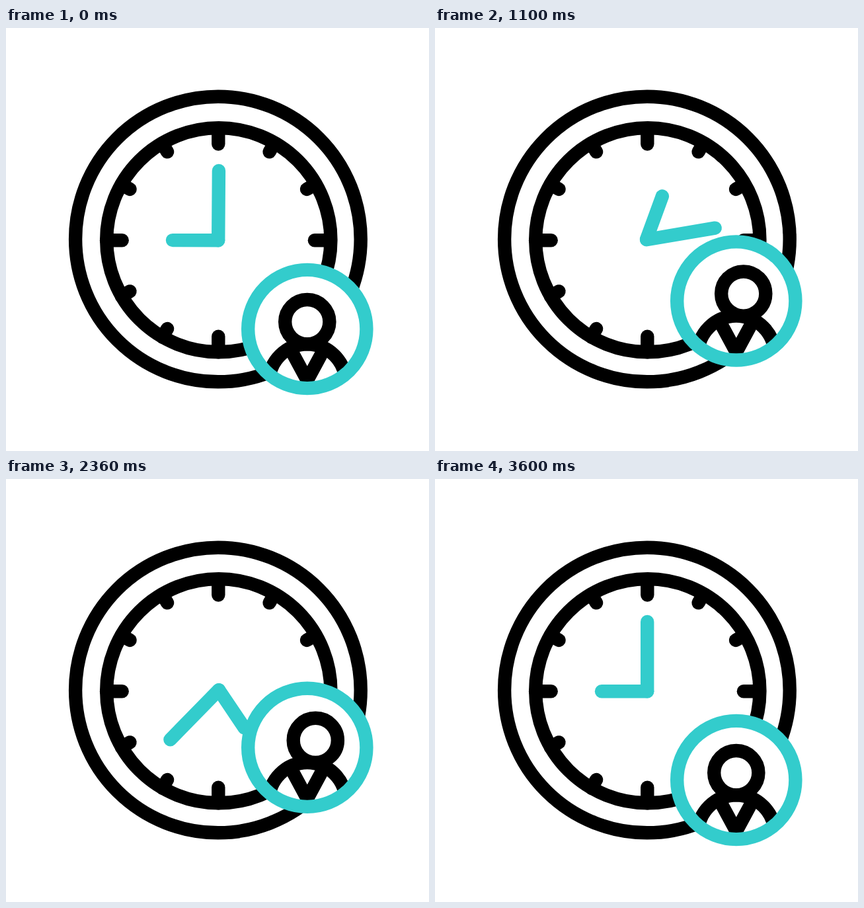
An HTML page for the animation above (3.62 s loop, 640 by 640 pixels).

```html
<!DOCTYPE html>
<html lang="en">
<head>
<meta charset="utf-8">
<title>Clock with person badge</title>
<style>
  html, body { margin: 0; height: 100%; overflow: hidden; background: #fff; }
  svg { display: block; width: 100vw; height: 100vh; }
  .ink, .accent { fill: none; stroke: #000; stroke-width: 20.4; stroke-linecap: round; stroke-linejoin: round; }
  .accent { stroke: #3cc; }
</style>
</head>
<body>
<svg viewBox="0 0 640 640">
  <defs>
    <clipPath id="inside"><circle cx="455.8" cy="455.5" r="89"/></clipPath>
  </defs>
  <g class="ink">
    <circle cx="320.9" cy="319.5" r="215.8"/>
    <circle cx="321.8" cy="320.7" r="169.6"/>
    <g id="ticks"></g>
  </g>
  <g class="accent">
    <path id="hour" d="M321.2 321.2H252"/>
    <path id="minute" d="M321.2 321.2V216"/>
  </g>
  <g id="badge">
    <circle cx="455.8" cy="455.5" r="89.6" fill="#fff"/>
    <g class="ink" clip-path="url(#inside)">
      <circle id="head" cx="455.8" cy="444.6" r="33.6"/>
      <circle cx="455.8" cy="536.3" r="58.1"/>
      <path d="M431 487L455.8 533L480.6 487"/>
    </g>
    <circle class="accent" cx="455.8" cy="455.5" r="89.6"/>
  </g>
</svg>
<script>
  const LOOP = 3620, CYCLE = 3600, RISE = 64, SWAY = 12.8;
  const swayKeys = [0, -SWAY, SWAY, -SWAY, SWAY, -SWAY, 0];
  const byId = id => document.getElementById(id);
  const set = (id, transform) => byId(id).setAttribute('transform', transform);
  const smooth = x => x * x * (3 - 2 * x);

  byId('ticks').innerHTML = Array.from({ length: 12 }, (_, i) =>
    `<path d="M321.3 ${i % 3 ? 166.7 : 175.6}V152" transform="rotate(${i * 30} 321.3 321.2)"/>`).join('');

  function sway(t) {
    const step = CYCLE / (swayKeys.length - 1);
    const i = Math.min(Math.floor(t / step), swayKeys.length - 2);
    return swayKeys[i] + (swayKeys[i + 1] - swayKeys[i]) * smooth(t / step - i);
  }

  function draw(now) {
    const t = Math.min(now % LOOP, CYCLE);
    const turn = 360 * t / CYCLE;
    set('hour', `rotate(${turn} 321.2 320)`);
    set('minute', `rotate(${turn * 4} 321.2 320)`);
    set('badge', `translate(0 ${-RISE * smooth(1 - Math.abs(2 * t / CYCLE - 1))})`);
    set('head', `translate(${sway(t)} 0)`);
    requestAnimationFrame(draw);
  }
  draw(0);
</script>
</body>
</html>
```
